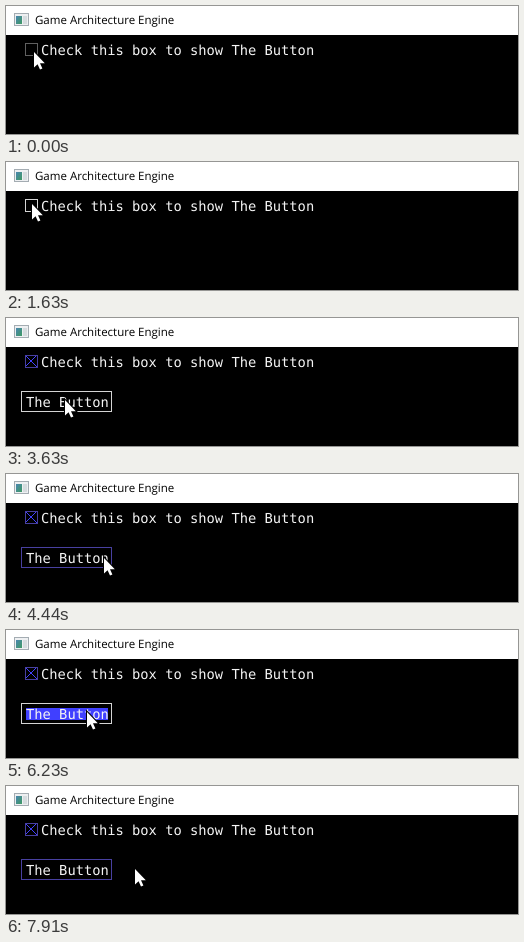
Recreate the animation shown at these times as an HTML page. Size 512 by 128 pixels, loop 8 s.

```html
<!DOCTYPE html>
<html lang="en">
<head>
<meta charset="utf-8">
<title>Checkbox and button</title>
<style>
  html, body { margin: 0; width: 100%; height: 100%; overflow: hidden; background: #000; }
  svg { display: block; }
  text { white-space: pre; text-rendering: geometricPrecision; }
  .mono { font: 13.75px "DejaVu Sans Mono", monospace; fill: #f4f4f4; }
  .title { font: 11.5px "Open Sans", "Noto Sans", sans-serif; fill: #000; }
  .frame { fill: none; stroke: #606060; }
  .checked .frame { stroke: #4840a0; }
  svg .frame.hot { stroke: #d4d4d4; }
</style>
</head>
<body>
<svg id="stage" width="512" height="128" viewBox="0 0 512 128">
  <defs>
    <linearGradient id="pane" x2="1" y2="1">
      <stop offset="0" stop-color="#4a86b0"/>
      <stop offset="1" stop-color="#3f9a63"/>
    </linearGradient>
  </defs>
  <rect width="512" height="29" fill="#fff"/>
  <rect x="8.5" y="7.5" width="14" height="12" fill="#eef0f2" stroke="#a4acb2"/>
  <rect x="10" y="10" width="6" height="8" fill="url(#pane)"/>
  <rect x="17" y="10" width="4" height="8" fill="#d6dcdf"/>
  <text class="title" x="29" y="18">Game Architecture Engine</text>

  <rect id="box" class="frame" x="19.5" y="37.5" width="12" height="12"/>
  <path id="cross" d="M20 38L31 49M30 38L20 48" stroke="#4040ff"/>
  <text class="mono" x="35" y="49">Check this box to show The Button</text>

  <g id="button">
    <rect id="edge" class="frame" x="15.5" y="73.5" width="90" height="20"/>
    <rect id="fill" x="20" y="78" width="82" height="12" fill="#4040ff"/>
    <text class="mono" x="20" y="89">The Button</text>
  </g>
  <text id="message" class="mono" x="20" y="109">You pressed The Button!</text>

  <path id="cursor" d="M0 0V15.5L3.6 12.2L6 17.4L8.4 16.4L6 11.2H10.8Z"
        fill="#fff" stroke="#000" stroke-width="2" paint-order="stroke"/>
  <circle id="click" r="10" fill="#ff0" fill-opacity=".47"/>
</svg>
<script>
const LOOP = 8000, STEP = 135;
const $ = id => document.getElementById(id);

// Pointer moves: start time, number of steps, destination
const moves = [
  [0, 1, 28, 46], [150, 3, 24, 46], [700, 1, 26, 46],
  [850, 3, 69, 45], [1220, 4, 26, 42], [3050, 1, 24, 43],
  [3360, 3, 59, 82], [3750, 4, 144, 85], [4290, 2, 98, 84],
  [4570, 2, 82, 82], [5680, 1, 81, 82], [7630, 2, 132, 83], [7910, 1, 129, 83]
];

const smooth = p => p * p * (3 - 2 * p);

function pointer(t) {
  let x = 40, y = 48;
  for (const [start, steps, toX, toY] of moves) {
    if (t < start) break;
    const p = smooth(Math.min(1, (Math.floor((t - start) / STEP) + 1) / steps));
    x += (toX - x) * p;
    y += (toY - y) * p;
  }
  return [Math.round(x), Math.round(y)];
}

const show = (id, on) => { $(id).style.display = on ? "" : "none"; };

function draw(t) {
  const during = (from, to) => t >= from && t < to;
  const [x, y] = pointer(t);

  // Hover reacts one step late
  const [hx, hy] = pointer(t - STEP);
  const hover = (id, left, top, right, bottom) => $(id).classList.toggle("hot",
    hx >= left && hx <= right && hy >= top && hy <= bottom);
  hover("box", 18, 36, 34, 51);
  hover("edge", 15, 71, 106, 95);

  const checked = t >= 2340;
  $("stage").classList.toggle("checked", checked);
  show("cross", checked);
  show("button", checked);
  show("fill", during(5120, 6360));
  show("message", during(6360, 7330));
  show("click", during(2190, 2340) || during(5120, 6230));
  $("cursor").setAttribute("transform", `translate(${x} ${y})`);
  $("click").setAttribute("transform", `translate(${x + .5} ${y + 1.5})`);
}

const start = performance.now();
function tick() {
  draw((performance.now() - start) % LOOP);
  requestAnimationFrame(tick);
}
tick();
</script>
</body>
</html>
```
